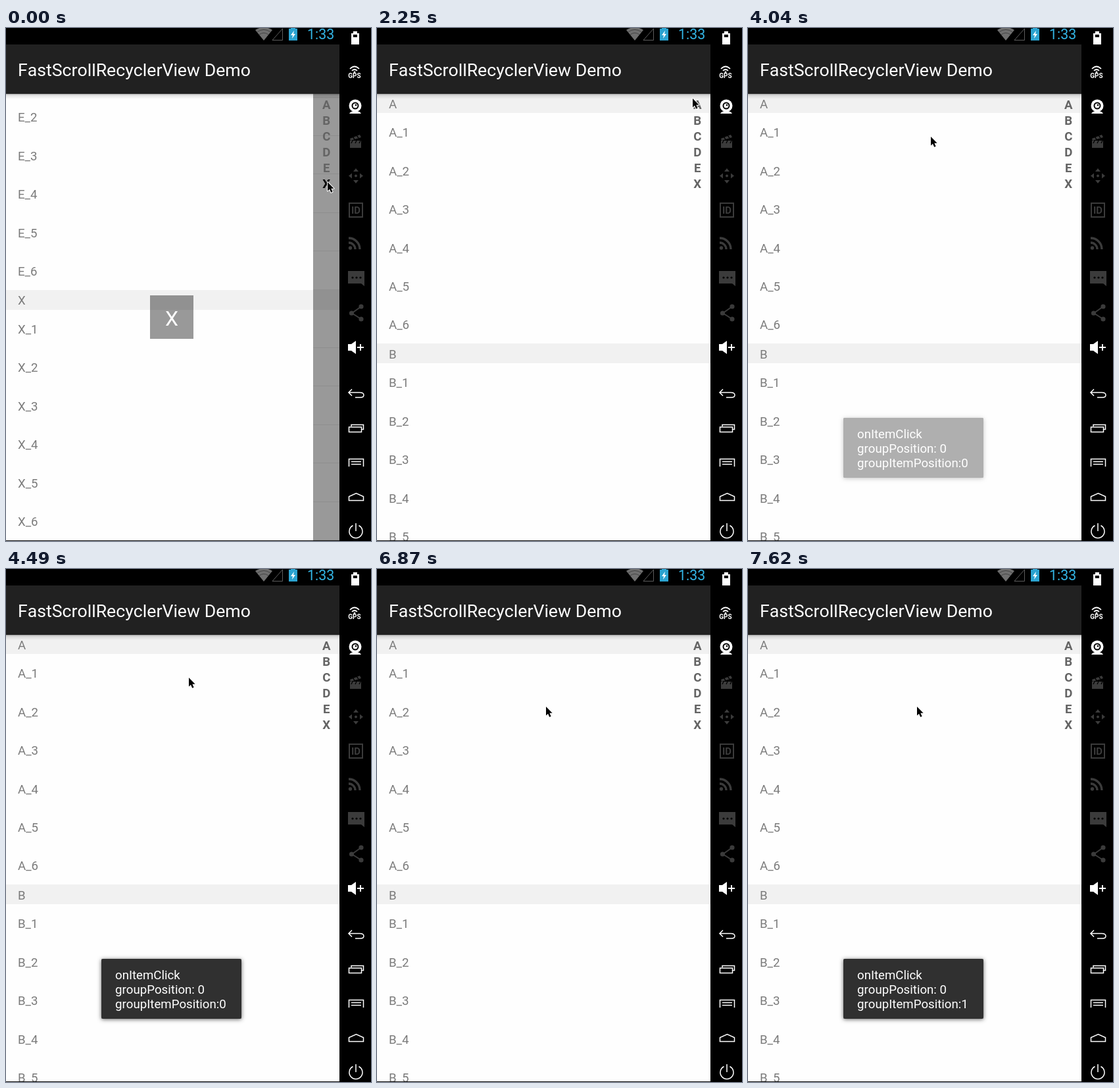
Animation of 555 by 779 pixels, one loop 8000 ms. Source, as an HTML page with a canvas:

```html
<!DOCTYPE html>
<html lang="en">
<head>
<meta charset="utf-8">
<title>Fast scroll list</title>
<style>
html, body { margin: 0; width: 100%; height: 100%; overflow: hidden; background: #000; }
canvas { display: block; }
</style>
</head>
<body>
<canvas id="stage" width="555" height="779"></canvas>
<script>
const ctx = document.getElementById('stage').getContext('2d');
const LOOP = 8000, STEP = 148;
const LIST_TOP = 99, LIST_BOTTOM = 778, LIST_WIDTH = 507;
const HEADER = 29.5, ROW = 58.45, ROWS = 6;
const GROUP = HEADER + ROW * ROWS;
const GROUPS = 'ABCDEX';
const MAX_SCROLL = GROUP * GROUPS.length - (LIST_BOTTOM - LIST_TOP);
const DIM = '#3b3b3b';
ctx.fontKerning = 'none';

const clamp = (v, lo = 0, hi = 1) => Math.min(hi, Math.max(lo, v));
const mix = (a, b, p) => a + (b - a) * p;
// Number of screen refreshes since `start`, from 0 up to `count`
const ticks = (t, start, count) => clamp(Math.floor((t - start) / STEP) + 1, 0, count);

function rect(x, y, w, h, color) {
  ctx.fillStyle = color;
  ctx.fillRect(x, y, w, h);
}
function text(str, x, y, size, color, weight = 400, align = 'left') {
  ctx.font = `${weight} ${size}px Roboto, sans-serif`;
  ctx.textAlign = align;
  ctx.fillStyle = color;
  ctx.fillText(str, x, y);
}
function shape(d, color) {
  ctx.fillStyle = color;
  ctx.fill(new Path2D(d));
}
function line(d, color, width = 1.5) {
  ctx.strokeStyle = color;
  ctx.lineWidth = width;
  ctx.stroke(new Path2D(d));
}
function dot(x, y, r, color) {
  ctx.beginPath();
  ctx.arc(x, y, r, 0, 7);
  ctx.fillStyle = color;
  ctx.fill();
}

function drawList(scroll) {
  rect(0, LIST_TOP, LIST_WIDTH, LIST_BOTTOM - LIST_TOP, '#fefefe');
  [...GROUPS].forEach((name, g) => {
    const top = LIST_TOP + g * GROUP - scroll;
    rect(0, Math.round(top), LIST_WIDTH, 30, '#f1f1f1');
    text(name, 18, Math.round(top + HEADER / 2 + 7.8), 18.67, '#7b7b7b');
    for (let i = 0; i < ROWS; i++) {
      const middle = top + HEADER + (i + .5) * ROW;
      text(`${name}_${i + 1}`, 18, Math.round(middle + 7.5), 18.67, '#7b7b7b');
    }
  });
}

function drawOverlay(letter, scroll) {
  ctx.save();
  ctx.beginPath();
  ctx.rect(467, LIST_TOP, 40, LIST_BOTTOM - LIST_TOP);
  ctx.rect(219, 406, 66, 66);
  ctx.clip();
  rect(0, LIST_TOP, LIST_WIDTH, LIST_BOTTOM - LIST_TOP, 'rgba(0,0,0,.4)');
  for (let g = 0; g < GROUPS.length; g++)
    for (let i = 1; i <= ROWS; i++) {
      const y = LIST_TOP + g * GROUP + HEADER + i * ROW - scroll;
      rect(0, Math.round(y) - 1, LIST_WIDTH, 1, 'rgba(0,0,0,.07)');
    }
  ctx.restore();
  text(letter, 252, 452, 32, '#fff', 400, 'center');
}

function drawIndex(selected) {
  [...GROUPS].forEach((name, i) =>
    text(name, 487.3, 123 + i * 24, 18.67, name === selected ? '#000' : '#646464', 700, 'center'));
}

function drawBars() {
  rect(0, 0, LIST_WIDTH, 25, '#000');
  rect(0, 25, LIST_WIDTH, 75, '#212121');
  const shadow = ctx.createLinearGradient(0, 100, 0, 108);
  shadow.addColorStop(0, 'rgba(0,0,0,.32)');
  shadow.addColorStop(.3, 'rgba(0,0,0,.1)');
  shadow.addColorStop(1, 'rgba(0,0,0,0)');
  rect(0, 100, LIST_WIDTH, 8, shadow);
  text('FastScrollRecyclerView Demo', 18, 73, 26.67, '#fff');

  shape('M392 19L379 3Q392-5 405 3Z', '#6f6f6f');
  line('M382 6Q392-1 402 6M385 10Q392 5 399 10', '#444', 1);
  line('M405 18.5H420.5V1Z', '#5c5c5c', 1);
  rect(430, 1, 13, 18, '#2ba3d0');
  rect(433, 0, 7, 2, '#2ba3d0');
  shape('M438 4L433 11H436L435 16L440 9H437Z', '#fff');
  text('1:33', 458, 17, 21.33, '#33b5e5');
  rect(0, LIST_BOTTOM, LIST_WIDTH, 1, '#111');
}

function drawToolbar() {
  const white = '#fff';
  rect(LIST_WIDTH, 0, 48, 779, '#000');

  shape('M528 5H534V8H537V25H525V8H528Z', white);
  rect(528, 10, 6, 4, '#000');

  line('M523 62Q530 55 537 62M526 65Q530 61 534 65', white, 1.7);
  dot(530, 67, 1.5, white);
  text('GPS', 530, 76, 10, white, 700, 'center');

  shape('M522 130Q524 126 531 126Q538 126 540 130Z', white);
  dot(531, 118, 9.5, white);
  dot(531, 118, 5.5, '#000');
  dot(531, 118, 3.5, white);
  dot(532, 117, 1.3, '#000');

  shape('M523 171H540V182H523ZM523 168L538 162L540 166L524 171Z', DIM);
  line('M527 165L530 169M533 163L536 167M527 171L525 175M533 171L531 175M539 171L537 175', '#000', 1.3);

  shape('M532 213L536 218H528ZM532 236L536 231H528ZM521 224.5L526 220.5V228.5ZM543 224.5L538 220.5V228.5Z', DIM);
  dot(532, 224.5, 2, DIM);

  line('M522 266H542V287H522Z', DIM, 2);
  text('ID', 532, 282, 15, DIM, 700, 'center');

  dot(523.5, 334, 2.7, DIM);
  line('M521 326A10 10 0 0 1 531 336M521 319A17 17 0 0 1 538 336', DIM, 3.3);

  shape('M520 369H545V392L540 388H520Z', DIM);
  for (const x of [527, 533, 539]) dot(x, 379, 1.6, '#000');

  line('M540 423L526 433L540 442', DIM, 2);
  for (const [x, y] of [[540, 423], [525.5, 433], [540, 442]]) dot(x, y, 3.6, DIM);

  shape('M520 480H525L532 475V495L525 490H520Z', white);
  line('M534 485H544M539 480V490', white, 2);

  line('M526 548.5L521 553.5L526 558.5M521 553.5H538Q544 553.5 544 557.5Q544 561 539 561H531', white);
  line('M525 605V602.5H543.5V609.5H541M521.5 606H540.5V613.5H521.5Z', white);
  line('M521.5 666V654.5H543.5V666M525 658.5H540M525 662.5H540', white);
  line('M521.5 717.5V711.5L532.5 706.5L543.5 711.5V717.5Z', white);
  line('M527.5 755.5A10 10 0 1 0 536.5 755.5M532 752V764', white);
}

function drawToast(item, alpha) {
  if (!alpha) return;
  const box = new Path2D(), outside = new Path2D();
  box.roundRect(145, 592, 213, 91, 2);
  outside.rect(0, 0, 555, 779);
  outside.addPath(box);

  ctx.save();
  ctx.globalAlpha = alpha;
  ctx.fillStyle = '#303030';
  ctx.fill(box);
  // The shadow stays outside so it does not darken a half-faded box
  ctx.clip(outside, 'evenodd');
  ctx.shadowColor = 'rgba(0,0,0,.6)';
  ctx.shadowBlur = 6;
  ctx.shadowOffsetY = 1;
  ctx.fill(box);
  ctx.restore();
  ['onItemClick', 'groupPosition: 0', `groupItemPosition:${item}`].forEach((label, i) =>
    text(label, 166, 623 + i * 22, 18.67, '#fff'));
}

function drawPointer(x, y) {
  ctx.save();
  ctx.translate(x, y);
  const arrow = 'M0 0V13.5L3 10.7L5.2 15.8L7.6 14.8L5.4 9.8H9.6Z';
  ctx.lineJoin = 'round';
  line(arrow, '#fff', 2);
  shape(arrow, '#000');
  ctx.restore();
}

function pointerAt(t) {
  const drag = ticks(t, 750, 6) / 6;
  const leave = ticks(t, 2690, 3) / 3;
  const next = ticks(t, 6574, 3) / 3;
  const x = mix(489, 480, clamp(drag * 1.5)), y = mix(234, 107, drag);
  return [mix(mix(x, 278, leave), 257, next), mix(mix(y, 165, leave), 209, next)];
}

function toastAt(t) {
  const fadeIn = start => Math.sin(ticks(t, start, 4) / 4 * Math.PI / 2);
  if (t >= 7170) return [1, fadeIn(7170)];
  const fadeOut = [1, .77, .43, .12, 0][ticks(t, 6130, 4)];
  return [0, fadeIn(4040) * fadeOut];
}

function draw(t) {
  const letter = 'XXEEDBA'[ticks(t, 750, 6)];
  const scroll = Math.min(GROUPS.indexOf(letter) * GROUP, MAX_SCROLL);
  const touching = t < 2250;
  drawList(scroll);
  if (touching) drawOverlay(letter, scroll);
  drawIndex(touching ? letter : '');
  drawBars();
  drawToolbar();
  drawToast(...toastAt(t));
  drawPointer(...pointerAt(t));
}

const began = performance.now();
function frame() {
  draw((performance.now() - began) % LOOP);
  requestAnimationFrame(frame);
}
frame();
</script>
</body>
</html>
```
